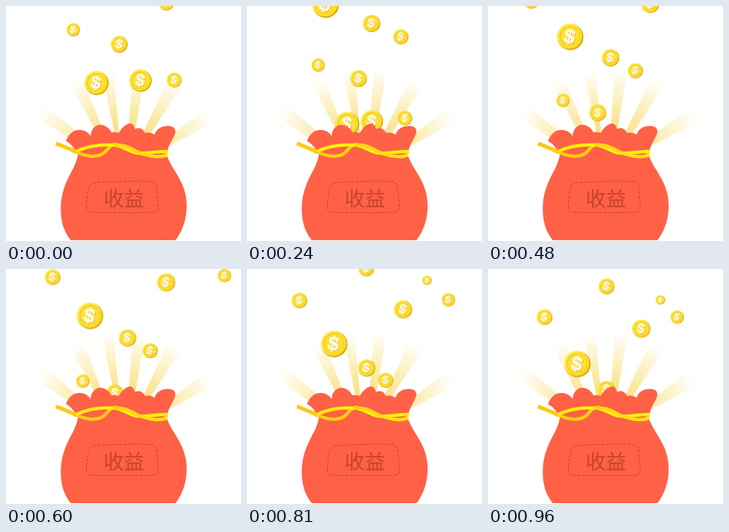
An HTML page that plays this animation: 294x294 px, repeating every 990 ms.

```html
<!DOCTYPE html>
<html lang="zh">
<head>
<meta charset="utf-8">
<title>收益</title>
<style>
  html, body { margin: 0; width: 100%; height: 100%; overflow: hidden; background: #fff; }
  svg { display: block; width: 100vw; height: 100vh; }
  .coins use { animation: fall 990ms steps(33) -1ms infinite; }
  /* --x, --y: start; --dx, --dy: travel in one loop; --r: radius */
  @keyframes fall {
    from { transform: translate(var(--x), var(--y)) scale(calc(var(--r) / 10)); }
    to {
      transform: translate(calc(var(--x) + var(--dx)), calc(var(--y) + var(--dy))) scale(calc(var(--r) / 10));
    }
  }
  .sign { font: bold 14.5px "Liberation Sans", Arial, sans-serif; text-anchor: middle; }
  .label { font: 25.5px "Noto Sans CJK SC", "Noto Sans CJK", sans-serif; fill: #c9432c; }
</style>
</head>
<body>
<svg viewBox="0 0 294 294">
  <defs>
    <radialGradient id="glow" gradientUnits="userSpaceOnUse" cx="0" cy="0" r="106"
      gradientTransform="translate(148 180) scale(1.18 1)">
      <stop offset=".2" stop-color="#f8df78"/>
      <stop offset=".5" stop-color="#fae9a4" stop-opacity=".9"/>
      <stop offset=".78" stop-color="#fdf3cb" stop-opacity=".7"/>
      <stop offset="1" stop-color="#fffbea" stop-opacity="0"/>
    </radialGradient>
    <linearGradient id="rim" x1="0" y1="0" x2="1" y2="1">
      <stop offset="0" stop-color="#fff05a"/>
      <stop offset=".5" stop-color="#ffe628"/>
      <stop offset="1" stop-color="#ffd90f"/>
    </linearGradient>
    <linearGradient id="rope" gradientUnits="userSpaceOnUse" x1="62" y1="0" x2="202" y2="0">
      <stop offset="0" stop-color="#fcc816"/>
      <stop offset=".45" stop-color="#fdd012"/>
      <stop offset="1" stop-color="#ffe512"/>
    </linearGradient>
    <clipPath id="open"><rect width="294" height="200"/></clipPath>
    <g id="coin">
      <circle cx=".35" cy=".35" r="9.7" fill="#d6a514"/>
      <circle cx="-.2" cy="-.2" r="9.3" fill="url(#rim)"/>
      <circle cx="-.2" cy="-.2" r="7.5" fill="#ebbc1a"/>
      <circle cx="0" cy="0" r="7.1" fill="#ffdf3c"/>
      <g class="sign" transform="rotate(12)">
        <text x=".5" y="5.4" fill="#dfa90f">$</text>
        <text x="-.2" y="4.9" fill="#fffdea" stroke="#fffdea" stroke-width=".4">$</text>
      </g>
    </g>
  </defs>

  <g fill="url(#glow)">
    <path d="M34 136 46 122 92 160 88 172Z"/>
    <path d="M78 92 94 86 121 155 114 160Z"/>
    <path d="M119 78 134 76 142 165 137 165Z"/>
    <path d="M159 76 175 78 161 160 153 158Z"/>
    <path d="M204 90 221 99 178 164 170 162Z"/>
    <path d="M260 122 274 138 203 176 198 168Z"/>
  </g>

  <g clip-path="url(#open)"><g class="coins">
    <use href="#coin" style="--x:84px;--y:29.5px;--dx:19.8px;--dy:182.4px;--r:8.5"/>
    <use href="#coin" style="--x:141.5px;--y:47.7px;--dx:-9.1px;--dy:176.5px;--r:10.8"/>
    <use href="#coin" style="--x:113px;--y:96px;--dx:49.5px;--dy:210.4px;--r:15.3"/>
    <use href="#coin" style="--x:168px;--y:93px;--dx:-49.5px;--dy:210.4px;--r:14.2"/>
    <use href="#coin" style="--x:210.3px;--y:92.5px;--dx:-54px;--dy:196px;--r:9.5"/>
    <use href="#coin" style="--x:200.3px;--y:-4px;--dx:-33.2px;--dy:174.7px;--r:9.7"/>
    <use href="#coin" style="--x:158.3px;--y:-21.5px;--dx:-10.8px;--dy:177.3px;--r:11"/>
    <use href="#coin" style="--x:93.5px;--y:-42.2px;--dx:18.5px;--dy:165.7px;--r:16.8"/>
    <use href="#coin" style="--x:37.2px;--y:-73.4px;--dx:34.4px;--dy:137.6px;--r:10"/>
    <use href="#coin" style="--x:214.2px;--y:-80.2px;--dx:-23.4px;--dy:159.5px;--r:11.5"/>
    <use href="#coin" style="--x:333.8px;--y:-78.7px;--dx:-100.4px;--dy:143px;--r:8.6"/>
    <use href="#coin" style="--x:154.4px;--y:-122.5px;--dx:-6.6px;--dy:148.5px;--r:10.2"/>
    <use href="#coin" style="--x:276.3px;--y:-118.3px;--dx:-62.7px;--dy:161.7px;--r:6.1"/>
  </g></g>

  <path fill="#ff6146" d="M81 293C72 282 68.500 269 68.500 253C68.500 236 74 222 81 209
    Q88 197 90 186C86 178 81 172 75 169C79 159 85 155 92 155Q101 155 106 163
    C106 154 112 148.500 118 148.500Q127 149 132 158Q137 157 141 159
    C145 152 151 146.500 156 147Q160 148 161.500 154Q166 151.500 170 154Q173 156 174 159
    Q180 157 186 161C188 153 196 150 203 150Q211 150 212 156C212 164 203 171 201 186
    C204 196 211 205 217 216C223 227 226 238 226 250C226 268 220 283 212 293Z"/>

  <g fill="none" stroke="url(#rope)" stroke-width="4">
    <path stroke-width="5" d="M62.500 172C70 175 79 178 88 183"/>
    <path d="M84 181C96 187 108 189 116 187C128 184 126 173 139 173"/>
    <path stroke="#ffef0c" d="M88 182C102 175 120 173 136 174C149 176 154 183 164 184C176 185 186 182 202 182"/>
    <path d="M134 174C153 172 159 182 171 185C182 188 190 190 200 187L201 180"/>
  </g>

  <path fill="none" stroke="#c9432c" stroke-dasharray="3.500 2" d="M100.500 252Q101 237 104 226Q106 221 112 221
    Q148 218.500 181 219.500Q187 220 188 226Q190 239 190.500 252Q190.500 258 184 258
    Q145 259 106 258Q100.500 258 100.500 252Z"/>
  <text class="label" x="122" y="249.500">收益</text>
</svg>
</body>
</html>
```
